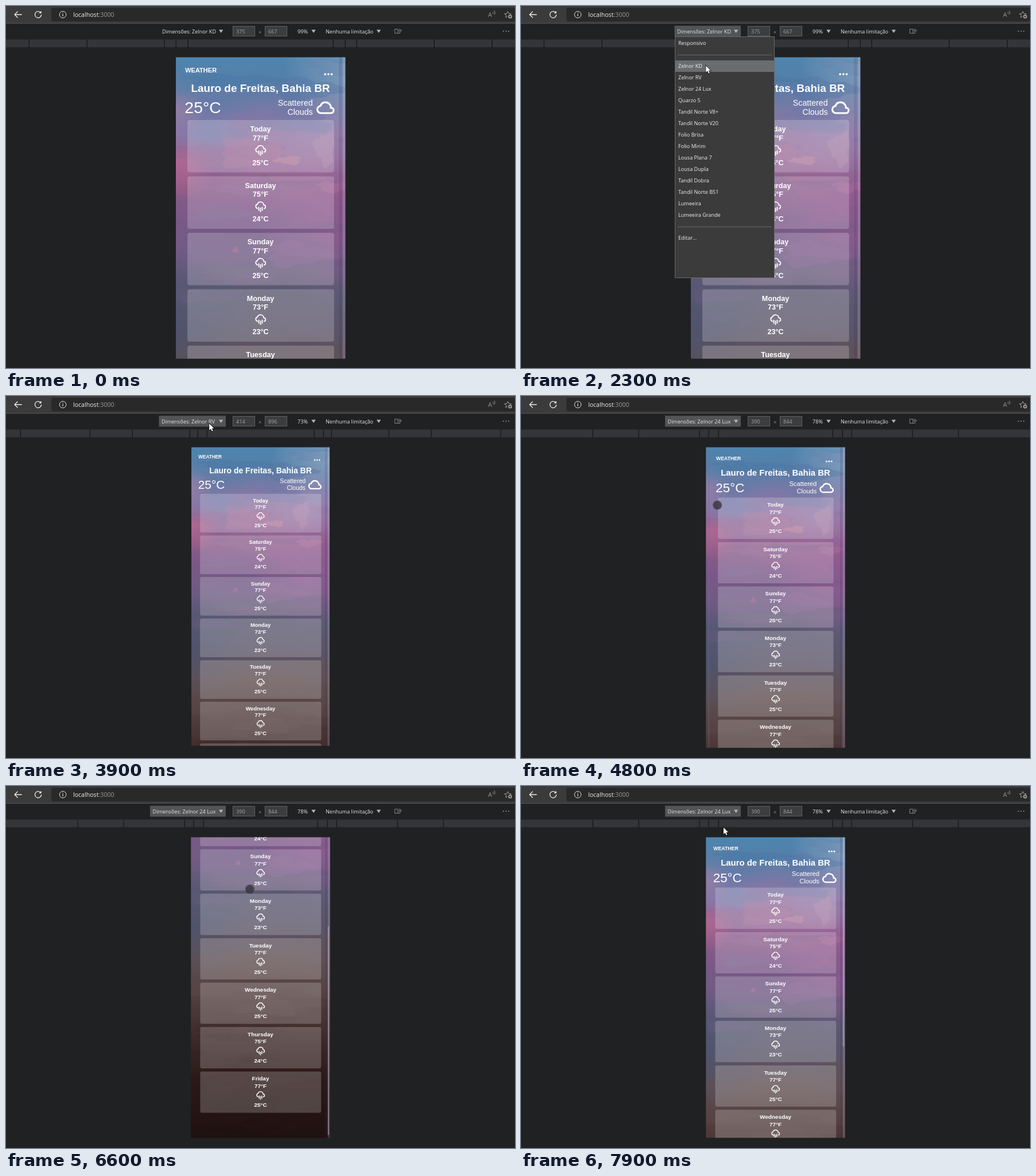
Write an HTML page with a canvas that moves like this. It is 887 px wide and 632 px high and loops after 8000 ms.

```html
<!DOCTYPE html>
<html lang="pt">
<head>
<meta charset="utf-8">
<title>Weather preview</title>
<style>
  html, body { margin: 0; width: 100%; height: 100%; overflow: hidden; background: #202123; }
  canvas { display: block; width: 887px; height: 632px; }
</style>
</head>
<body>
<canvas id="stage" width="887" height="632"></canvas>
<script>
const ctx = document.getElementById('stage').getContext('2d');
const LOOP = 8000, CX = 443.5, TOP = 89.5, PAGE_H = 1214;
const UI = '"Open Sans", "Noto Sans", sans-serif';
const SANS = '"Liberation Sans", Arial, sans-serif';

const devices = [
  { name: 'Zelnor KD', w: 375, h: 667, zoom: 99, left: 272, dy: -0.7 },
  { name: 'Zelnor RV', w: 414, h: 896, zoom: 73, left: 271, dy: 0 },
  { name: 'Zelnor 24 Lux', w: 390, h: 844, zoom: 78, left: 255.5, dy: 1 }
];
const menuRows = ['Responsivo', '', ...devices.map(d => d.name), 'Quarzo 5', 'Tandil Norte V8+',
  'Tandil Norte V20', 'Folio Brisa', 'Folio Mirim', 'Lousa Plana 7', 'Lousa Dupla', 'Tandil Dobra',
  'Tandil Norte B51', 'Lumeeira', 'Lumeeira Grande', '', 'Editar...'];
const forecast = [['Today', 77, 25], ['Saturday', 75, 24], ['Sunday', 77, 25], ['Monday', 73, 23],
  ['Tuesday', 77, 25], ['Wednesday', 77, 25], ['Thursday', 75, 24], ['Friday', 77, 25]];

// time, x, y of the pointer
const pointerKeys = [
  [200, 60, 2], [900, 407, 237], [1000, 407, 237], [1400, 372, 62], [1500, 369, 54], [1800, 350, 44],
  [2000, 335, 60], [2400, 318, 119], [2600, 318, 119], [2800, 364, 147], [3200, 420, 250],
  [3600, 400, 170], [3700, 362.5, 52.5], [4000, 350, 46], [4400, 323, 154], [4700, 323, 154],
  [5100, 400, 300], [5600, 410, 190], [5800, 412, 150], [6000, 424, 180], [6100, 428, 400],
  [6600, 425, 180], [7000, 428, 140], [7100, 428, 140], [7500, 429, 253], [7700, 425, 340],
  [7900, 353, 72.5]
];
// time, page offset in stage pixels
const scrollKeys = [[5100, 0], [5600, 120], [5700, 120], [6000, 1], [6600, 222], [7000, 230],
  [7100, 230], [7500, 116.5], [7800, 0]];

function track(keys, t) {
  if (t <= keys[0][0]) return keys[0].slice(1);
  for (let i = 1; i < keys.length; i++) {
    const a = keys[i - 1], b = keys[i];
    if (t <= b[0]) {
      const k = (t - a[0]) / (b[0] - a[0]);
      return a.slice(1).map((v, n) => v + (b[n + 1] - v) * k);
    }
  }
  return keys[keys.length - 1].slice(1);
}

function text(c, str, x, y, size, color, align = 'left', font = UI, weight = 400) {
  c.font = `${weight} ${size}px ${font}`;
  c.fillStyle = color;
  c.textAlign = align;
  c.fillText(str, x, y);
}
function rect(x, y, w, h, color) {
  ctx.fillStyle = color;
  ctx.fillRect(x, y, w, h);
}
function round(x, y, w, h, r, color) {
  ctx.beginPath();
  ctx.roundRect(x, y, w, h, r);
  ctx.fillStyle = color;
  ctx.fill();
}
function disc(x, y, r, color) {
  ctx.beginPath();
  ctx.arc(x, y, r, 0, 7);
  ctx.fillStyle = color;
  ctx.fill();
}
function stroke(path, x, y, scale, width, color) {
  ctx.save();
  ctx.translate(x, y);
  ctx.scale(scale, scale);
  ctx.lineWidth = width;
  ctx.strokeStyle = color;
  ctx.stroke(path);
  ctx.restore();
}

const cloud = new Path2D('M18 12C18 8.7 15.3 6 12 6C9.5 6 7.3 7.6 6.5 10C4.5 10.4 3 12.1 3 14a4 4 0 0 0 4 4h11a3 3 0 0 0 0-6z');
const rain = new Path2D('M7 16a4.2 4.2 0 0 1-.6-8.2C7.2 5.3 9.4 3.8 12 3.8c3.3 0 5.8 2.4 6 5.6a3.3 3.3 0 0 1 0 6.6M8.8 13v7M12 14.5v8M15.2 13v7');
const back = new Path2D('M6.5 0H-6M-.5-5.5L-6 0l5.500 5.500');
const reload = new Path2D('M4.600-3.200A5.600 5.600 0 1 0 5.600 0M5-6v3.200H1.800');
const star = new Path2D('M0-6l1.800 3.700 4 .6-2.900 2.800M-1 3L-3.600 4.500l.7-4L-5.800-1.700l4-.6L0-6');
const rotate = new Path2D('M-6-4h6v8h-6zM0-1h4v5h-4M2-4c2.500 0 4 .8 4 3.500M4.500-1.500L6 0l1.500-1.500');
const arrow = new Path2D('M0 0V11.500L2.700 9l1.900 4.300 1.800-.8L4.600 8.300H8.200z');

// Painted dusk sky, in page units
const ramp = [[0, 78, 133, 174], [70, 86, 126, 168], [120, 109, 122, 167], [170, 133, 119, 166],
  [230, 144, 109, 155], [290, 139, 91, 138], [360, 122, 88, 136], [440, 112, 91, 132], [520, 91, 89, 115],
  [620, 91, 85, 102], [700, 97, 80, 82], [790, 84, 65, 65], [900, 66, 46, 44], [1040, 43, 25, 23], [1214, 30, 17, 16]];

function paintSky() {
  const sky = document.createElement('canvas');
  sky.width = 420;
  sky.height = PAGE_H + 20;
  const c = sky.getContext('2d');
  let seed = 41;
  const rnd = () => (seed = seed * 16807 % 2147483647) / 2147483647;
  const base = c.createLinearGradient(0, 0, 0, PAGE_H);
  for (const [y, ...rgb] of ramp) base.addColorStop(y / PAGE_H, `rgb(${rgb})`);
  c.fillStyle = base;
  c.fillRect(0, 0, 420, PAGE_H + 20);

  const glow = (x, y, r, rgb, a) => {
    const g = c.createRadialGradient(x, y, 0, x, y, r);
    g.addColorStop(0, `rgba(${rgb},${a})`);
    g.addColorStop(1, `rgba(${rgb},0)`);
    c.fillStyle = g;
    c.fillRect(x - r, y - r, 2 * r, 2 * r);
  };
  const blob = (x, y, rx, ry, rgb, a) => {
    const p = rnd() * 6, q = rnd() * 6;
    c.beginPath();
    for (let i = 0; i < 40; i++) {
      const u = i / 40 * Math.PI * 2;
      const k = 1 + 0.22 * Math.sin(3 * u + p) + 0.12 * Math.sin(7 * u + q);
      c.lineTo(x + Math.cos(u) * rx * k, y + Math.sin(u) * ry * k);
    }
    c.fillStyle = `rgba(${rgb},${a})`;
    c.fill();
  };
  glow(410, 20, 170, '170,185,205', 0.6);
  glow(0, 240, 90, '195,100,140', 0.6);
  glow(0, 120, 70, '175,130,165', 0.55);
  glow(220, 200, 150, '180,120,160', 0.35);
  glow(360, 180, 130, '175,145,185', 0.4);
  glow(350, 370, 170, '165,95,155', 0.5);
  glow(0, 600, 170, '70,82,112', 0.55);
  for (let i = 0; i < 120; i++) {
    const y = rnd() * 1180;
    const rgb = track(ramp, Math.max(0, y + (rnd() - 0.5) * 170)).map(Math.round);
    blob(rnd() * 420, y, 25 + rnd() * 70, 7 + rnd() * 17, rgb, 0.16 + rnd() * 0.18);
  }
  blob(120, 55, 100, 14, '70,118,166', 0.4);
  blob(290, 75, 75, 24, '84,116,163', 0.35);
  blob(70, 170, 60, 28, '128,122,172', 0.45);
  blob(160, 215, 65, 32, '178,118,156', 0.28);
  blob(250, 232, 28, 9, '196,134,160', 0.5);
  blob(330, 205, 22, 36, '190,140,172', 0.3);
  blob(350, 290, 36, 12, '178,112,158', 0.35);
  blob(100, 350, 60, 14, '118,98,140', 0.4);
  blob(270, 440, 70, 26, '142,98,146', 0.35);
  blob(132, 431, 7, 6, '160,92,140', 0.7);
  blob(180, 480, 120, 12, '105,94,122', 0.35);
  return sky;
}
const sky = paintSky();

function drawBrowser() {
  rect(0, 0, 887, 31, '#3b3b3b');
  round(79, 3, 830, 24, 4, '#292929');
  rect(0, 29.500, 887, 1.500, '#4a4a4a');
  stroke(back, 21, 15, 1, 1.300, '#eee');
  stroke(reload, 56, 15, 1, 1.300, '#eee');
  ctx.lineWidth = 1;
  ctx.strokeStyle = '#ddd';
  ctx.beginPath();
  ctx.arc(99, 15, 5.800, 0, 7);
  ctx.stroke();
  rect(98.400, 14, 1.200, 4, '#ddd');
  rect(98.400, 11.500, 1.200, 1.300, '#ddd');
  text(ctx, 'localhost', 117, 19, 10.600, '#f0f0f0');
  text(ctx, ':3000', 161.500, 19, 10.600, '#9a9a9a');
  text(ctx, 'A', 840, 19, 11, '#8f8f8f');
  stroke(new Path2D('M0-3q1.500 2 0 4M2.500-5q2.500 4 0 7'), 848.500, 13, 1, 1, '#8f8f8f');
  stroke(star, 874.500, 15.500, 1, 1, '#a5a5a5');
  disc(878.500, 18.500, 3.300, '#a5a5a5');
  rect(876.500, 18, 4, 1, '#292929');
  rect(878, 16.500, 1, 4, '#292929');
}

function caret(x) {
  ctx.beginPath();
  ctx.moveTo(x - 3.700, 41.500);
  ctx.lineTo(x + 3.700, 41.500);
  ctx.lineTo(x, 47);
  ctx.fillStyle = '#b5b5b5';
  ctx.fill();
}

function drawToolbar(dev, focus, label) {
  rect(0, 31, 887, 601, '#202123');
  if (focus) rect(dev.left - 4.500, 34.500, 388 - 0.500 - dev.left, 19, '#535456');
  text(ctx, 'Dimensões: ' + dev.name, dev.left, 47.700, 9.100, '#e4e4e4');
  caret(374.700);
  [[395.500, dev.w, 401], [451.500, dev.h, 457]].forEach(([x, n, tx]) => {
    rect(x, 35.500, 38, 17, '#3c3d3f');
    ctx.strokeStyle = '#5f6062';
    ctx.lineWidth = 1;
    ctx.strokeRect(x, 35.500, 38, 17);
    text(ctx, n, tx, 47.700, 9.100, '#a2a2a2');
  });
  text(ctx, '×', 442.500, 49, 9.100, '#8f8f8f', 'center');
  text(ctx, dev.zoom + '%', 508, 47.700, 9.100, '#e4e4e4');
  caret(536);
  text(ctx, 'Nenhuma limitação', 557, 47.700, 9.100, '#e4e4e4');
  caret(649.500);
  stroke(rotate, 683, 44, 0.900, 1, '#929292');
  for (let i = -1; i < 2; i++) disc(871.500 + i * 4.700, 44, 0.900, '#a0a0a0');

  rect(0, 58, 887, 1, '#2a2b2d');
  rect(0, 59, 887, 13, '#343538');
  for (const w of [320, 375, 425, 768, 1024, 1440]) {
    const half = w / 2 * dev.zoom / 100 * 0.797;
    rect(Math.round(CX - half) - 0.500, 59, 1.500, 13, '#191a1c');
    rect(Math.round(CX + half) - 0.500, 59, 1.500, 13, '#191a1c');
  }
  if (label) text(ctx, 'S móvel – 320px', CX, 69, 9.100, '#dcdcdc', 'center');
}

function drawPhone(dev, scroll, narrow, bar) {
  const s = dev.zoom / 100 * 0.797, W = dev.w, left = CX - W * s / 2;
  const page = narrow ? 375 : W, inset = (W - page) / 2;
  const label = (str, x, y, size, align, weight) => text(ctx, str, x, y, size, '#fff', align, SANS, weight);
  ctx.save();
  ctx.beginPath();
  ctx.rect(left, TOP, W * s, dev.h * s);
  ctx.clip();
  ctx.translate(left, TOP + dev.dy - scroll);
  ctx.scale(s, s);
  ctx.drawImage(sky, 0, -3);
  const sheen = ctx.createLinearGradient(W - 14, 0, W, 0);
  sheen.addColorStop(0, 'rgba(50,40,80,.18)');
  sheen.addColorStop(0.500, 'rgba(50,40,80,.1)');
  sheen.addColorStop(0.600, 'rgba(210,200,225,.2)');
  sheen.addColorStop(1, 'rgba(210,200,225,.2)');
  ctx.fillStyle = sheen;
  ctx.fillRect(W - 14, -3, 14, PAGE_H);

  ctx.translate(inset, 0);
  if (narrow) {
    rect(0, 0, 1.600, PAGE_H, 'rgba(120,110,150,.5)');
    rect(page - 1.600, 0, 1.600, PAGE_H, 'rgba(120,110,150,.5)');
  }
  label('WEATHER', 21, 34, 14, 'left', 700);
  for (let i = -1; i < 2; i++) disc(page - 37.500 + i * 7.200, 38.300, 2.400, '#fff');
  label('Lauro de Freitas, Bahia BR', page / 2, 77.500, 24, 'center', 700);
  label('25°C', 20, 124, 36);
  label('Scattered', page - 72, 107.500, 18, 'right');
  label('Clouds', page - 72, 128.500, 18, 'right');
  stroke(cloud, page - 68, 88.500, 2, 2, '#fff');

  forecast.forEach(([day, f, c], i) => {
    const y = 139.700 + i * 124.800, mid = page / 2;
    round(26, y, page - 51, 116, 5, 'rgba(255,255,255,.2)');
    label(day, mid, y + 25.500, 16, 'center', 700);
    label(f + '°F', mid, y + 45.500, 16, 'center', 700);
    stroke(rain, mid - 14.400, y + 52, 1.200, 1.900, '#fff');
    label(c + '°C', mid, y + 99.800, 16, 'center', 700);
  });
  ctx.restore();
  if (bar) {
    const ratio = dev.h / PAGE_H;
    round(left + W * s - 4, TOP + 1 + scroll * ratio, 2.300, dev.h * s * ratio, 1.200, 'rgba(190,180,200,.5)');
  }
}

function drawMenu(current, y) {
  rect(268, 53, 174, 422, '#6a6a6a');
  rect(269, 54, 172, 420, '#3b3b3b');
  const hover = y > 75 ? Math.floor((y - 55) / 20) : current + 2;
  menuRows.forEach((name, i) => {
    const top = 55 + i * 20;
    if (!name) return rect(273, top + 10, 164, 1, '#6a6a6a');
    if (i === hover) rect(269, top, 172, 20, '#6b6c6e');
    text(ctx, name, 274, top + 13.300, 9.100, '#f0f0f0');
  });
}

function drawPointer(x, y, touch) {
  if (touch) {
    disc(x, y, 8, 'rgba(45,45,50,.62)');
    disc(x, y, 6.500, 'rgba(60,60,66,.6)');
    return;
  }
  stroke(arrow, x, y, 1, 1.400, '#111');
  ctx.save();
  ctx.translate(x, y);
  ctx.fillStyle = '#fff';
  ctx.fill(arrow);
  ctx.restore();
}

const within = (t, a, b) => t >= a && t < b;

function draw(now) {
  const t = Math.floor(now % LOOP / 100) * 100;
  const index = t < 2800 ? 0 : t < 4800 ? 1 : 2;
  const dev = devices[index];
  const menu = within(t, 1900, 2600) || within(t, 4000, 4800);
  const narrow = within(t, 2800, 3000) || within(t, 4800, 5000);
  const [x, y] = track(pointerKeys, t);
  const [scroll] = track(scrollKeys, t);

  drawToolbar(dev, t >= 1900, within(t, 1400, 1700));
  drawBrowser();
  drawPhone(dev, scroll, narrow, t >= 5200);
  if (menu) drawMenu(index, y);
  if (t >= 200 && !within(t, 4600, 4800)) {
    const half = dev.w * dev.zoom / 100 * 0.797 / 2;
    drawPointer(x, y, !menu && y > TOP && Math.abs(x - CX) < half);
  }
}

const start = performance.now();
function tick() {
  draw(performance.now() - start);
  requestAnimationFrame(tick);
}
tick();
</script>
</body>
</html>
```
